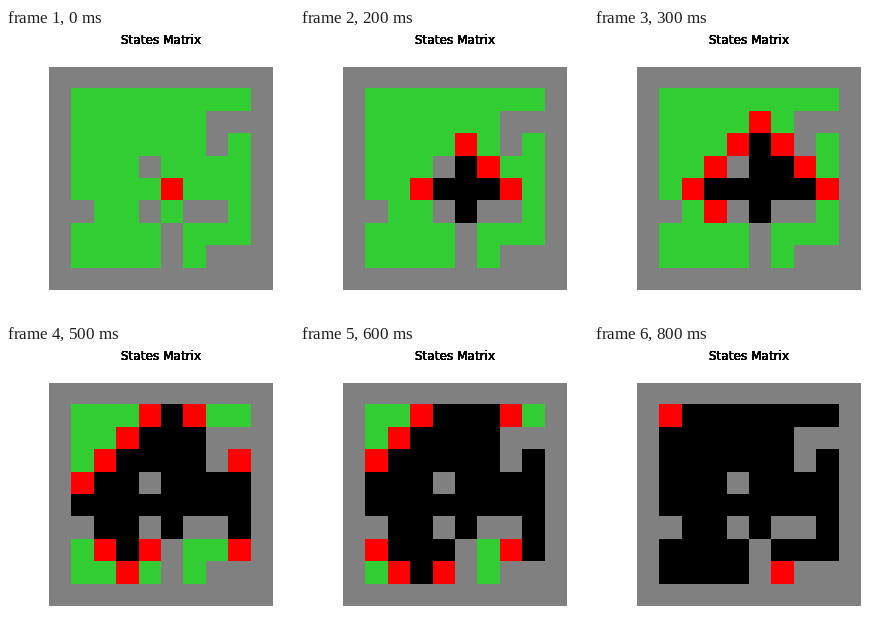
A matplotlib script for the animation above (900 ms loop, 288 px wide and 288 px high).

```python
import numpy as np
import matplotlib.pyplot as plt
from matplotlib.animation import FuncAnimation
from matplotlib.colors import ListedColormap

SIZE, DPI = 288, 72
STEPS, INTERVAL = 9, 100
TREE, WALL, FIRE, ASH = range(4)
COLORS = ListedColormap(["limegreen", "gray", "red", "black"])
N = 10
START = (5, 5)
INNER_WALLS = [(2, 7), (2, 8), (3, 7), (4, 4), (6, 1), (6, 4), (6, 6),
               (6, 7), (7, 5), (8, 5), (8, 7), (8, 8)]


def build_walls():
    walls = np.ones((N, N), bool)
    walls[1:-1, 1:-1] = False
    for cell in INNER_WALLS:
        walls[cell] = True
    return walls


def burn_times(walls):
    """Steps the fire needs to reach each cell through its four neighbours."""
    times = np.full((N, N), 99)
    times[START] = 0
    queue = [START]
    for r, c in queue:
        for cell in ((r - 1, c), (r + 1, c), (r, c - 1), (r, c + 1)):
            if not walls[cell] and times[cell] == 99:
                times[cell] = times[r, c] + 1
                queue.append(cell)
    return times


WALLS = build_walls()
TIMES = burn_times(WALLS)


def states(step):
    grid = np.full((N, N), TREE)
    grid[TIMES == step] = FIRE
    grid[TIMES < step] = ASH
    grid[WALLS] = WALL
    return grid


fig = plt.figure(figsize=(SIZE / DPI, SIZE / DPI), dpi=DPI, facecolor="white")
ax = fig.add_axes([0, 0, 1, 1])
ax.set_axis_off()

# Cell edges sit on whole pixels
x_edges = np.round(43 + 22.4 * np.arange(N + 1))
y_edges = np.round(38 + 22.4 * np.arange(N + 1))
y_edges[0] = 39
mesh = ax.pcolormesh(x_edges, y_edges, states(0), cmap=COLORS, vmin=-0.5,
                     vmax=3.5, antialiased=False, edgecolors="none")
ax.set_xlim(0, SIZE)
ax.set_ylim(SIZE, 0)

# Stacked copies thicken the soft edges of the title
for _ in range(9):
    ax.text(155, 16, "States Matrix", ha="center", va="baseline",
            fontsize=12, family="DejaVu Sans", color="black")


def update(step):
    mesh.set_array(states(step))
    return [mesh]


anim = FuncAnimation(fig, update, frames=STEPS, interval=INTERVAL,
                     repeat=True, repeat_delay=0, blit=False)
plt.show()
```
